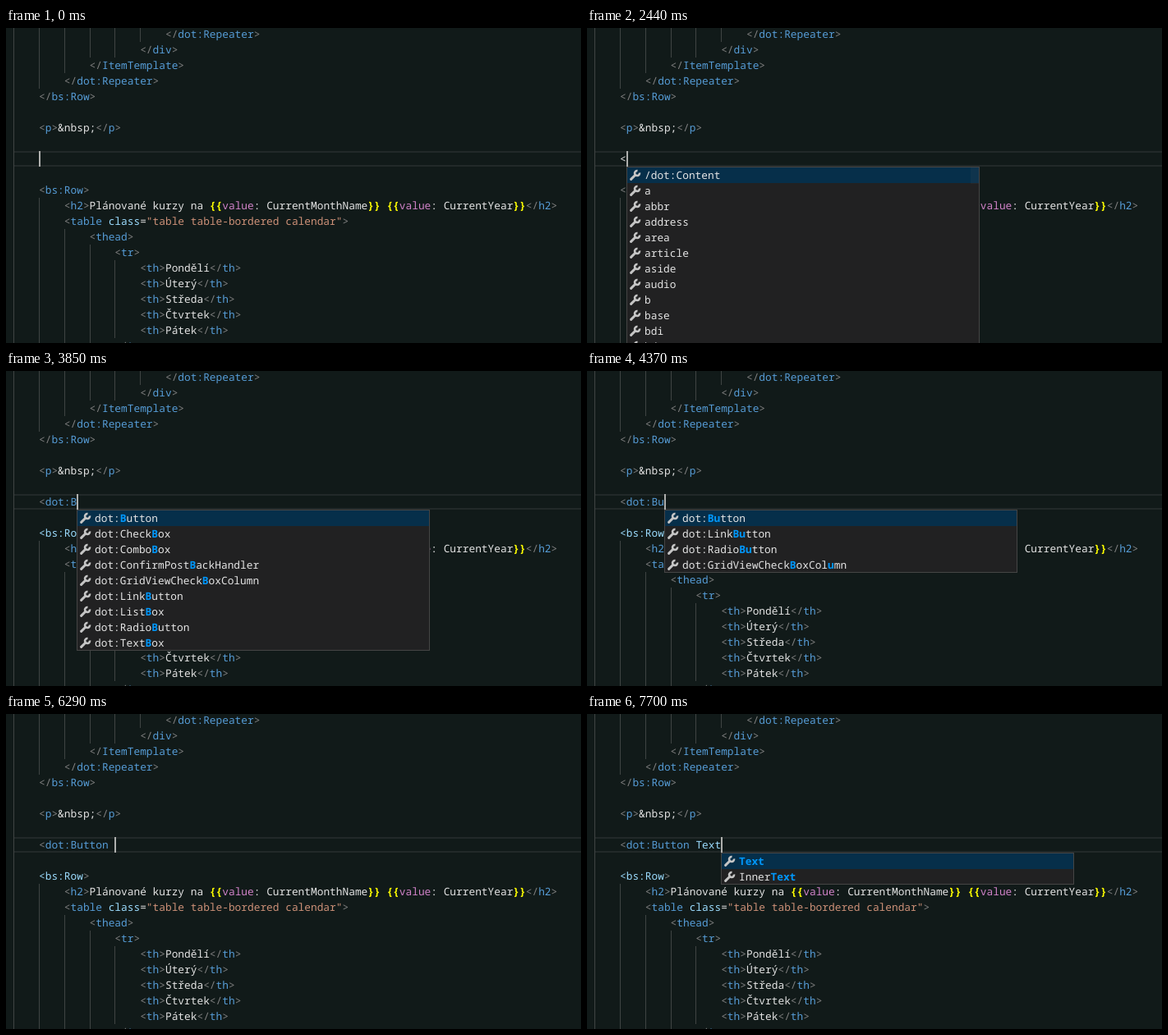
Write an HTML page that moves like this. It is 700 px wide and 384 px high and loops after 8 s.

```html
<!DOCTYPE html>
<html lang="en">
<head>
<meta charset="utf-8">
<title>Code completion</title>
<style>
html, body { margin: 0; width: 100%; height: 100%; overflow: hidden; background: #111a19; }
svg { display: block; }
text { font: 12.83px "Noto Sans Mono", "DejaVu Sans Mono", monospace; fill: #e4e4e4; white-space: pre; text-rendering: geometricPrecision; }
.bracket { fill: #808080; }
.tag { fill: #569cd6; }
.string { fill: #ce9178; }
.attr { fill: #9cdcfe; }
.brace { fill: #ffff00; font-weight: 700; }
.bind { fill: #d183c9; }
.hit { fill: #0097fb; font-weight: 700; }
.icon { fill: none; stroke: #c5c5c5; }
</style>
</head>
<body>
<svg id="stage" width="700" height="384" viewBox="0 0 700 384"></svg>
<script>
const LOOP = 8000, CHAR = 7.697, LINE = 19, LEFT = 40, TOP = -2;
const TYPED_ROW = 8, NEXT_TAG_ROW = 10, POPUP_WIDTH = 430, MAX_ITEMS = 12;
const TYPED = '<dot:Button Text';

// Each line: indent in columns (from the left guide), then its markup.
const LINES = [
  [24, '</dot:Repeater>'], [20, '</div>'], [12, '</ItemTemplate>'], [8, '</dot:Repeater>'],
  [4, '</bs:Row>'], [4, ''], [4, '<p>&nbsp;</p>'], [4, ''], [4, ''], [4, ''],
  [4, '<bs:Row>'],
  [8, '<h2>Plánované kurzy na {{value: CurrentMonthName}} {{value: CurrentYear}}</h2>'],
  [8, '<table class="table table-bordered calendar">'],
  [12, '<thead>'], [16, '<tr>'],
  ...['Pondělí', 'Úterý', 'Středa', 'Čtvrtek', 'Pátek'].map(day => [20, `<th>${day}</th>`]),
  [16, '</tr>'],
];

const HTML_TAGS = '/dot:Content a abbr address area article aside audio b base bdi bdo data datalist dd del details dfn dialog div dl';
const CONTROLS = 'AuthenticatedView Button CheckBox ClaimView ComboBox ConfirmPostBackHandler Content ContentPlaceHolder DataItemContainer DataPager Decorator DesignMarkupControl GridView GridViewCheckBoxColumn LinkButton ListBox RadioButton Repeater TextBox';
const TAGS = [...HTML_TAGS.split(' '), ...CONTROLS.split(' ').map(name => 'dot:' + name)];
const ATTRS = 'ButtonTagName Click DataContext Enabled ID IncludeInPage InnerText IsSubmitButton Text Validation.Enabled Visible'.split(' ');

// [time, typed length, popup column (0 = closed), filter, caret, scrollbar opacity]
const STEPS = [
  [0, 0, 0, '', 1], [160, 0, 0, '', 0], [920, 0, 0, '', 1], [1380, 0, 0, '', 0], [1910, 0, 0, '', 1],
  [2310, 1, 0, '', 1], [2440, 1, 1, '', 1, .2], [2470, 1, 1, '', 1, .6], [2500, 1, 1, '', 1],
  [2830, 2, 1, '', 1], [2870, 2, 2, 'd', 1], [3000, 3, 2, 'd', 1], [3040, 3, 3, 'do', 1],
  [3200, 4, 3, 'do', 1], [3270, 4, 4, 'do', 1],
  [3430, 5, 4, 'do', 1], [3460, 5, 5, 'dot', 1],
  [3690, 6, 5, 'dot', 1], [3770, 6, 6, 'dot', 1], [3850, 6, 6, 'B', 1], [4080, 6, 6, 'B', 0],
  [4340, 7, 6, 'B', 1], [4370, 7, 7, 'Bu', 1], [4430, 8, 8, 'Bu', 1],
  [4630, 9, 8, 'But', 1], [4690, 9, 9, 'Butt', 1], [4760, 10, 9, 'Butt', 1], [4820, 10, 10, 'Butto', 1],
  [4980, 11, 10, 'Butto', 1], [5060, 11, 11, 'Butto', 1], [5140, 11, 11, 'Button', 1],
  [5500, 11, 11, 'Button', 0], [6060, 11, 11, 'Button', 1],
  [6260, 12, 0, '', 1], [6420, 12, 12, '', 1],
  [6650, 13, 12, '', 1], [6680, 13, 13, 'T', 1],
  [7010, 14, 13, 'T', 1], [7080, 14, 14, 'Te', 1], [7200, 15, 14, 'Te', 1], [7270, 15, 15, 'Tex', 1],
  [7470, 16, 15, 'Tex', 1], [7500, 16, 16, 'Tex', 1], [7700, 16, 16, 'Text', 1],
];

const escapeText = s => s.replace(/&/g, '&amp;').replace(/</g, '&lt;');
const span = (cls, s) => `<tspan class="${cls}">${escapeText(s)}</tspan>`;
const rect = (x, y, w, h, fill, more = '') => `<rect x="${x}" y="${y}" width="${w}" height="${h}" fill="${fill}" ${more}/>`;
const label = (x, y, content) => `<text x="${x}" y="${y}">${content}</text>`;
const columnX = column => Math.round(LEFT + column * CHAR);
const rowY = row => TOP + row * LINE;

const CLASSES = ['bracket', 'tag', 'string', 'attr', 'brace', 'bind'];
const SYNTAX = /(<\/?|>)|((?<=<\/?)[\w:]+)|("[^"]*")|(class)|(\{\{|\}\})|(value(?=:))|&/g;
function highlight(code) {
  return code.replace(SYNTAX, (token, ...groups) => {
    const kind = groups.slice(0, CLASSES.length).findIndex(Boolean);
    return kind < 0 ? escapeText(token) : span(CLASSES[kind], token);
  });
}

function typedMarkup(text) {
  if (text.length < 2) return escapeText(text);
  const [tag, attr] = text.split(' ');
  return highlight(tag) + (attr ? ' ' + span('attr', attr) : '');
}

function codeLine([indent, code], row, typed) {
  let out = '';
  for (let c = 0; c < indent; c += 4) out += rect(columnX(c - 4), rowY(row), 1, LINE, '#3f4443');
  let content = highlight(code);
  if (row === TYPED_ROW) content = typedMarkup(typed);
  // An unclosed tag above turns this one into an attribute.
  if (row === NEXT_TAG_ROW && typed.length > 1) content = span('attr', '<bs:Row') + span('bracket', '>');
  return out + label(LEFT + (indent - 4) * CHAR, rowY(row) + 14, content);
}

// Positions of the query's letters in the name, or null.
function match(name, query) {
  const at = name.indexOf(query);
  if (at >= 0) return [...query].map((_, i) => at + i);
  let last = -1;
  const hits = [...query].map(c => last = name.indexOf(c, last + 1));
  return hits.includes(-1) ? null : hits;
}

function rank(name, query) {
  if (name.startsWith(query) || name.split(':').pop().startsWith(query)) return 0;
  return name.includes(query) ? 1 : 2;
}

function itemMarkup(name, query) {
  const hits = match(name, query);
  return [...name].map((c, i) => hits.includes(i) ? span('hit', c) : c).join('');
}

const wrench = (x, y) => `<g class="icon" transform="translate(${x} ${y})">
  <path d="M2.6 12.4L8 7" stroke-width="3" stroke-linecap="round"/>
  <path d="M10.5 2A3 3 0 1 0 13 4.5" stroke-width="2.6"/></g>`;

function popup(column, query, fade = 1) {
  const names = (column < 12 ? TAGS : ATTRS).filter(name => match(name, query));
  if (query) names.sort((a, b) => rank(a, query) - rank(b, query));
  const shown = names.slice(0, MAX_ITEMS);
  const x = columnX(column), y = rowY(TYPED_ROW + 1), height = shown.length * LINE;
  let out = rect(x, y, POPUP_WIDTH, height + 1, '#212122') + rect(x, y + 1, POPUP_WIDTH, LINE, '#062f4a');
  shown.forEach((name, i) => {
    const top = y + 1 + i * LINE;
    out += wrench(x + 3, top + 2) + label(x + 22, top + 14, itemMarkup(name, query));
  });
  if (names.length > MAX_ITEMS) {
    out += rect(x + POPUP_WIDTH - 11, y + 1, 10, column < 4 ? 20 : 54, '#797979', `opacity="${.4 * fade}"`);
  }
  return out + rect(x + .5, y + .5, POPUP_WIDTH - 1, height, 'none', 'stroke="#454545"');
}

function scene([, length, column, query, caret, fade]) {
  const y = rowY(TYPED_ROW);
  return rect(10, y, 690, 2, '#222929') + rect(10, y + 17, 690, 2, '#222929')
    + LINES.map((line, row) => codeLine(line, row, TYPED.slice(0, length))).join('')
    + (caret ? rect(columnX(length), y, 2, LINE, '#aeafad') : '')
    + (column ? popup(column, query, fade) : '');
}

const stage = document.getElementById('stage');
let current;
function frame() {
  const time = performance.now() % LOOP;
  const step = STEPS.findLast(s => s[0] <= time);
  if (step !== current) stage.innerHTML = scene(current = step);
  requestAnimationFrame(frame);
}
frame();
</script>
</body>
</html>
```
